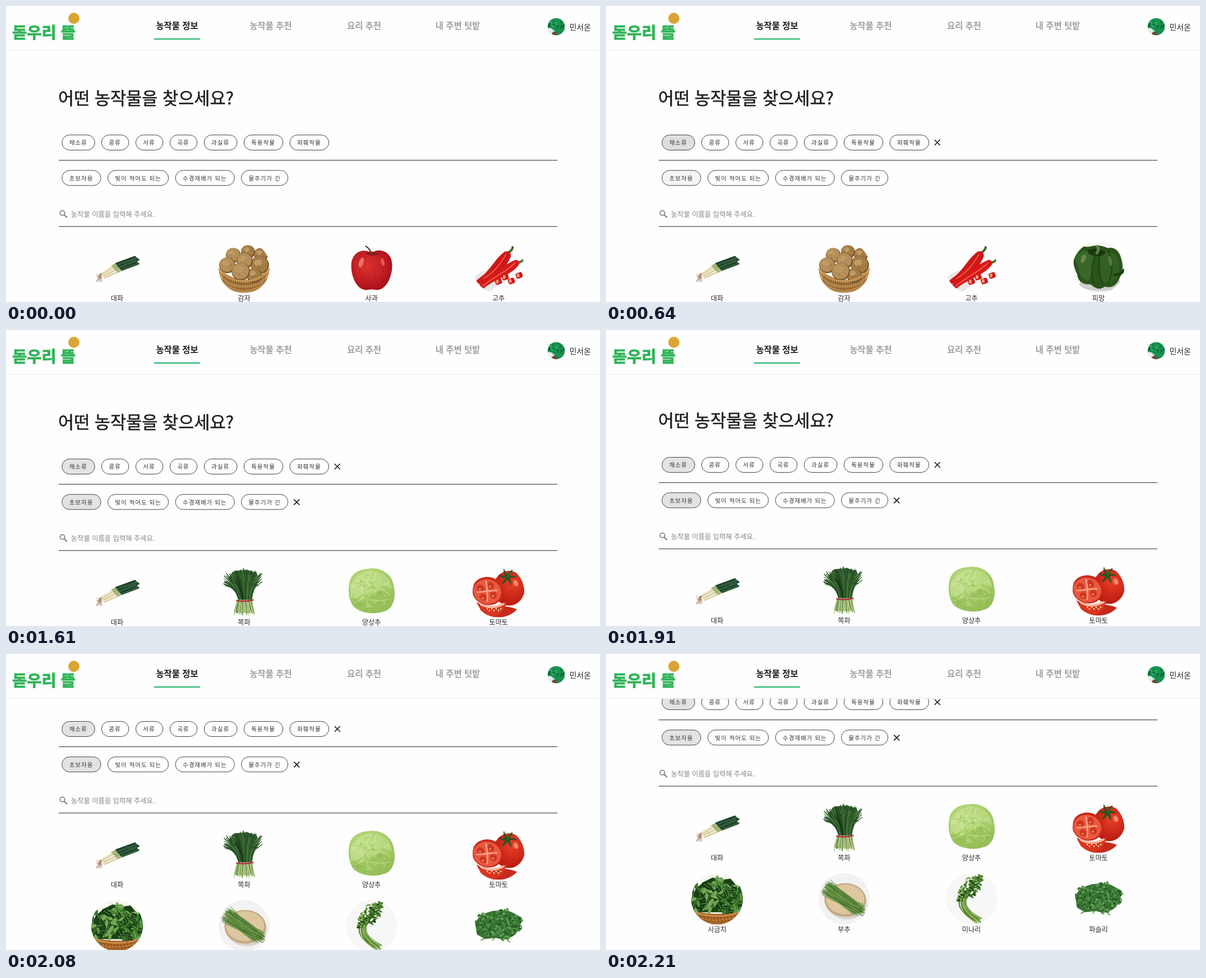
Recreate the animation shown at these times as an HTML page. Size 1059 by 529 pixels, loop 3020 ms.

```html
<!DOCTYPE html>
<html lang="ko">
<head>
<meta charset="utf-8">
<style>
html, body { margin: 0; width: 100%; height: 100%; overflow: hidden; background: #fefefe; }
svg { display: block; width: 100vw; height: 100vh; font-family: "Noto Sans CJK KR", "Noto Sans KR", "Noto Sans CJK", sans-serif; }
</style>
</head>
<body>
<svg id="stage" viewBox="0 0 1059 529"></svg>
<script>
const LOOP = 3020, SCROLL = 158;
const COLUMNS = [198, 424.5, 651.5, 878];

let seed = 1;
const rnd = (a = 0, b = 1) => {
  seed = (seed * 16807) % 2147483647;
  return a + (b - a) * seed / 2147483647;
};
const pick = list => list[Math.floor(rnd(0, list.length))];
const repeat = (n, make) => Array.from({ length: n }, (_, i) => make(i)).join('');

const path = (d, fill, stroke = 'none', w = 1) =>
  `<path d="${d}" fill="${fill}" stroke="${stroke}" stroke-width="${w}" stroke-linecap="round"/>`;
const line = (d, stroke, w = 1) => path(d, 'none', stroke, w);
const oval = (x, y, rx, ry, fill, turn = 0) =>
  `<ellipse rx="${rx}" ry="${ry}" fill="${fill}" transform="translate(${x} ${y}) rotate(${turn})"/>`;
const disc = (x, y, r, fill) => oval(x, y, r, r, fill);
const text = (x, y, size, str, fill, extra = '') =>
  `<text x="${x}" y="${y}" font-size="${size}" fill="${fill}" ${extra}>${str}</text>`;
const glow = (id, cx, cy, r, inner, outer) =>
  `<radialGradient id="${id}" cx="${cx}" cy="${cy}" r="${r}"><stop stop-color="${inner}"/><stop offset="1" stop-color="${outer}"/></radialGradient>`;
const MID = 'text-anchor="middle"';

// Each picture is drawn around 0,0 inside a disc of radius 46.
const food = {
  대파: () =>
    repeat(20, () => line(`M-28 ${rnd(9, 18)}Q-32 ${rnd(12, 20)} ${rnd(-37, -26)} ${rnd(10, 28)}`, '#a58268', .8)) +
    repeat(6, i => line(`M${-28 + i * 1.2} ${10 + i * 1.7}L${-6 + i * 2} ${-4 + i * 2.2}`, i % 2 ? '#cfc08c' : '#ece2bd', 1.9)) +
    repeat(6, i => line(`M${-9 + i * 2} ${-3 + i * 2.2}L${-1 + i * 2} ${-7 + i * 2.2}`, '#93a862', 2.4)) +
    repeat(6, i => line(`M${-1 + i * 2} ${-7 + i * 2.2}L${32 + i % 3 * 3} ${-19 + i * 2.4}`, i % 2 ? '#345d3c' : '#1b4029', 3.6)),

  감자: () =>
    path('M-45 2Q-43 44 0 45Q43 44 45 2Q25 20 0 22Q-25 20-45 2Z', '#a8763c') +
    [[7, -28, 12], [-19, -22, 13], [30, -23, 12], [-30, -4, 14], [28, -5, 16], [1, -12, 14], [18, 14, 13], [-6, 7, 16]]
      .map(([x, y, r], i) => oval(x, y, r + .5, r, '#79572b', 20) + oval(x - .6, y - 1, r - 1, r - 1.3, i % 2 ? '#b58f59' : '#a47c46') +
        oval(x - 3, y - 4, r * .45, r * .35, '#c09b65') +
        repeat(3, () => disc(x + rnd(-7, 7), y + rnd(-6, 7), .8, '#73522b'))).join('') +
    line('M-45 3Q-32 24 0 25Q32 24 45 3', '#d1a25e', 4) +
    line('M-42 14Q-28 34 0 34Q28 34 42 14', '#d1a25e', 4) +
    line('M-35 27Q-20 41 0 42Q20 41 35 27', '#c39450', 4) +
    repeat(21, i => {
      const x = (i - 10) * 3.9;
      return line(`M${x} ${25 - x * x * .009}l${-x * .13} 17`, '#714a20', 1);
    }),

  사과: () =>
    path('M0-26C14-37 37-29 37-4C37 20 24 41 9 40Q0 38-8 40C-25 41-36 18-36-3C-36-28-14-36 0-26Z', 'url(#apple)') +
    repeat(14, i => line(`M${-26 + i * 4} ${rnd(-24, -15)}q${(i - 7) * .5} 18 0 ${rnd(25, 42)}`, '#e85c4426', 1.6)) +
    oval(2, -25, 12, 3.5, '#8c1c1a') +
    line('M0-25Q-3-34-10-38', '#6b3a22', 2.5) +
    oval(-18, -9, 4, 9, '#ea7468', 18) + oval(20, -10, 3, 7, '#e55a50', -15),

  고추: () =>
    oval(-24, 26, 28, 19, '#e9e7e7', -30) +
    line('M17-27Q24-29 26-38', '#3c6b27', 4) +
    path('M12-29Q23-30 22-20C13 4-10 25-43 31Q-43 25-33 18C-15 6-5-18 12-29Z', '#cf1717') +
    line('M13-23C3-6-8 9-27 20', '#ee554a', 2) +
    line('M34-9Q42-9 46-17', '#467a2c', 4) +
    path('M31-14Q41-11 36-5C24 14-10 21-28 39Q-40 37-33 29C-13 14 10-6 31-14Z', '#d61919') +
    line('M29-8C16 6-9 17-28 33', '#ee5a4d', 2) +
    [[0, 25], [12, 17], [23, 24], [37, 14]].map(([x, y]) =>
      `<rect x="${x - 6}" y="${y - 5}" width="12" height="10" rx="3" fill="#cc1b1b" transform="rotate(-20 ${x} ${y})"/>` +
      oval(x - 2, y, 2.5, 3.5, '#f0a07e')).join(''),

  피망: () =>
    disc(0, 0, 46, '#f6f6f6') + oval(4, 29, 38, 13, '#cfcfcf') +
    path('M-43-26Q-37-40-18-37Q0-43 16-35Q34-38 40-18Q47 2 38 18Q30 39 11 34Q0 43-14 30Q-36 31-38 12Q-48-7-43-26Z', '#2b541b') +
    path('M-38-25Q-18-36-7-21Q-12 13-18 24Q-35 20-35 0Q-44-13-38-25Z', '#38672a') +
    path('M2-22Q25-35 34-17Q42 9 28 23Q12 33 5 20Z', '#335f22') +
    line('M-7-20Q-15 4-9 28M2-22Q-3 7 8 30M17-31Q30-5 18 28', '#1d4313', 2.2) +
    oval(-27, -16, 4, 8, '#66894f', 20) + oval(21, -12, 3, 9, '#557b42', -10) +
    path('M-20-31Q-3-38 13-27Q4-17-7-22Q-17-20-20-31Z', '#18370f') +
    line('M-3-26Q2-32-2-38', '#638447', 5) + line('M29 13Q40 13 45 5', '#1b3f12', 5),

  쪽파: () =>
    path('M-10 15Q-16-6-29-24L-18-37L5-39L22-34L27-22Q16-4 14 15Z', '#35602f') +
    repeat(130, () => {
      const x = rnd(-38, 33);
      return line(`M${2 + x * .3} 15Q${x * .42} -8 ${x} ${rnd(-43, -18) + Math.abs(x) * .3}`, pick(['#17391a', '#244f25', '#38682f', '#578348']), 1.2);
    }) +
    path('M-11 16L-17 37L17 39L15 16Z', '#a5bf79') +
    repeat(55, () => {
      const x = rnd(-12, 14);
      return line(`M${x} 15L${x * 1.5} ${rnd(30, 43)}`, pick(['#7da04d', '#a6c078', '#dfe6c8', '#517b39']), 1.2);
    }) +
    line('M-13 16Q2 19 16 15', '#b6333a', 2.6),

  양상추: () =>
    path('M-40-12C-38-30-26-40-4-41C16-44 38-32 40-8C45 10 38 34 20 36C4 42-24 38-34 24Q-43 8-40-12Z', 'url(#lettuce)') +
    path('M-38-10Q-24-38 4-37Q-10-18-14 2Q-24 14-37 12Z', '#cfe79d88') +
    path('M6-36Q34-32 37-4Q20-14 8-6Q0-20 6-36Z', '#c4e08c88') +
    path('M-34 18Q-10 20 4 2Q20-4 36 6Q32 30 12 35Q-18 38-34 18Z', '#94bd5788') +
    line('M-30 20Q0 8 8-34M-14 4Q-22-8-26-22M2 2Q18-8 30-18M-8 14Q14 18 32 14', '#e2f0bd99', 1.1) +
    repeat(60, () => {
      const a = rnd(0, 6.3), r = rnd(6, 34);
      return line(`M${Math.cos(a) * r} ${Math.sin(a) * r}q${rnd(-6, 6)} ${rnd(-6, 6)} ${rnd(-8, 8)} ${rnd(-8, 8)}`, pick(['#7dab4066', '#dcefae77']), 1.4);
    }),

  토마토: () =>
    oval(0, 36, 36, 10, '#c62a1d') +
    oval(19, -6, 28, 31, 'url(#tomato)') +
    oval(31, -15, 4, 6, '#f9826a', -25) +
    [0, 65, 130, 190, 245, 305].map(a => `<path transform="translate(16 -26) rotate(${a})" d="M0-2Q11-5 17 1Q9 0 0 3Z" fill="#30521f"/>`).join('') +
    line('M16-26Q18-32 24-35', '#3e6428', 2.5) +
    oval(-19, -1, 28, 25, '#c7281a', 15) + oval(-20, 0, 25, 22, '#e9593f', 15) +
    [[-32, -6], [-14, -11], [-27, 10], [-9, 6]].map(([x, y]) => oval(x, y, 6, 7, '#cf3722', x * 2) + disc(x - 1, y + 2, 1.6, '#f0a576')).join('') +
    line('M-22-18Q-19 0-20 17M-38 1Q-20-1-3-2', '#f6a48c', 2.6) +
    path('M-39 18Q-17 35 15 18Q9 42-12 46Q-32 40-39 18Z', '#d9341f') +
    line('M-31 23Q-12 33 9 22', '#f8b59b', 4) +
    repeat(7, i => oval(-20 + i * 4, 31 + i % 2 * 3, 1.3, 1.8, '#f4d19a')),

  시금치: () =>
    disc(0, 0, 46, '#f5f6ef') +
    path('M-46 0L-38-18L-24-30L-8-38L8-34L24-36L36-22L46-4V24H-46Z', '#1a4214') +
    path('M-46 20Q0 34 46 20V46H-46Z', '#a9642a') +
    repeat(110, () => {
      const x = rnd(-45, 45), y = rnd(-36 + Math.abs(x) * .3, 24), a = rnd(-90, 90);
      return oval(x, y, rnd(5, 11), rnd(2, 4.5), pick(['#12380f', '#1e5217', '#2d6b20', '#43832f', '#6a9f4c']), a) +
        `<path d="M-7 0H7" stroke="#a9c888" stroke-width=".7" transform="translate(${x} ${y}) rotate(${a})"/>`;
    }) +
    line('M-42 24Q0 38 42 24', '#cf9148', 2.5) + line('M-37 32Q0 45 36 31', '#c4843c', 2) +
    repeat(13, i => line(`M${-36 + i * 6} ${27 + 6 * Math.sin(i * .26)}l3 8`, '#7c4113', 1)),

  부추: () =>
    disc(0, 0, 46, '#f3f2f2') + oval(5, 7, 36, 30, '#d9d6d2') + oval(2, 2, 37, 30, '#c3a67a') +
    oval(2, 1, 34, 27, '#e0cba5') +
    repeat(6, i => `<ellipse cx="2" cy="1" rx="${6 + i * 5}" ry="${5 + i * 4}" fill="none" stroke="#cbb185" stroke-width=".8"/>`) +
    path('M-34-24L-22-27Q8-8 32 13L30 26L16 27Q-18 6-34-24Z', '#5d8440') +
    repeat(110, () => {
      const s = rnd(-12, 12);
      return line(`M${-28 + s * .6 + rnd(-9, 5)} ${-20 - s * .8 + rnd(-5, 5)}Q${rnd(-8, 4)} ${4 - s * .9} ${rnd(18, 38)} ${19 - s * .6 + rnd(-5, 6)}`, pick(['#325c22', '#4a7a2f', '#65913f', '#8aad60']), .9);
    }),

  미나리: () =>
    disc(0, 0, 46, '#f7f7f7') +
    repeat(32, () => {
      const s = rnd(-6, 6);
      return line(`M${2 + s} -20C${-22 + s} 0 ${-22 + s * 1.6} 18 ${12 + s * 1.5} ${rnd(34, 45)}`, pick(['#54852c', '#7aa646', '#a2c068', '#41751f']), 1.1);
    }) +
    repeat(170, () => {
      const t = rnd(), spread = 7 + 7 * Math.sin(t * 3.1);
      return oval(14 - t * 32 + rnd(-spread, spread), -38 + t * 37 + rnd(-spread, spread) * .8, rnd(1.5, 3.4), rnd(1, 2), pick(['#244d17', '#38691f', '#4c822c', '#6fa243']), rnd(0, 180));
    }),

  파슬리: () =>
    line('M2 5Q9 20 20 29M-8 5Q-18 20-31 26M0 6Q-4 18-10 26', '#6f9e4f', 2) +
    path('M-42-6L-30-20L-12-26L6-28L22-25L42-14L38 4L30 16L16 24L-6 22L-24 24L-38 16Z', '#3a7534') +
    repeat(420, () => {
      const a = rnd(0, 6.3), r = Math.sqrt(rnd());
      return disc(Math.cos(a) * r * 44, -2 + Math.sin(a) * r * (25 + 5 * Math.cos(a * 5)), rnd(.8, 2.4), pick(['#245822', '#35722f', '#4b8c42', '#69a25b']));
    })
};

const card = (name, i) => {
  seed = 4321;
  const x = COLUMNS[i % 4], y = 467.5 + Math.floor(i / 4) * 128;
  return `<g transform="translate(${x} ${y})"><g clip-path="url(#round)">${food[name]()}</g>` +
    text(0, 59, 12.2, name, '#2c2c2c', MID) + '</g>';
};
const results = (id, names) => `<g id="${id}">${names.split(' ').map(card).join('')}</g>`;

const chip = (x, y, w, label, id) => {
  const shape = `x="${x}" y="${y}" width="${w}" height="27" rx="13.5"`;
  const ripple = id ? `<clipPath id="${id}Clip"><rect ${shape}/></clipPath><g clip-path="url(#${id}Clip)"><circle id="${id}Ripple" cx="${x + 29.5}" cy="${y + 9}"/></g>` : '';
  return `<rect ${id ? `id="${id}"` : ''} ${shape} fill="#fefefe"/>${ripple}<rect ${shape} fill="none" stroke="#444"/>` +
    text(x + 12.9, y + 17.8, 10.6, label, '#383838', 'letter-spacing=".93"');
};
const cross = (id, x, y) => `<g id="${id}">${line(`M${x - 4.5} ${y - 4.5}l9 9m0-9l-9 9`, '#151515', 1.6)}</g>`;
const rule = y => `<rect x="94" y="${y}" width="889" height="1.3" fill="#555"/>`;
const tab = (x, label, fill = '#a0a0a0') => text(x, 41, 15.4, label, fill, MID + ' font-weight="600"');

stage.innerHTML = `
<defs>
  <clipPath id="round"><circle r="46"/></clipPath>
  ${glow('apple', .4, .4, .65, '#dc2e2c', '#a90f1b')}
  ${glow('tomato', .6, .35, .7, '#ea4028', '#b5170f')}
  ${glow('lettuce', .4, .3, .75, '#c3e087', '#93bd55')}
  <clipPath id="face"><circle cx="981" cy="37" r="15.3"/></clipPath>
</defs>
<g id="page">
  ${text(93, 176.3, 30.6, '어떤 농작물을 찾으세요?', '#1e1e1e', 'font-weight="500" stroke="#1e1e1e" stroke-width=".5"')}
  ${chip(99.8, 230.5, 58.5, '채소류', 'kind')}
  ${chip(170.4, 230.5, 48.5, '콩류')}${chip(231.4, 230.5, 48.5, '서류')}${chip(292.3, 230.5, 48.5, '곡류')}
  ${chip(353.2, 230.5, 58.8, '과실류')}${chip(424.3, 230.5, 69.5, '특용작물')}${chip(506, 230.5, 69.5, '화훼작물')}
  ${cross('clearKind', 590.7, 244)}${rule(275)}
  ${chip(99.8, 293.8, 69.3, '초보자용', 'trait')}
  ${chip(181.5, 293.8, 108.2, '빛이 적어도 되는')}${chip(302.1, 293.8, 105.2, '수경재배가 되는')}${chip(419.5, 293.8, 83.2, '물주기가 긴')}
  ${cross('clearTrait', 518.2, 307.6)}
  <circle cx="100.5" cy="370" r="4.2" fill="none" stroke="#757575" stroke-width="1.6"/>
  ${line('M103.8 373.3L108.3 377.8', '#757575', 2)}
  ${text(115.8, 377, 12.3, '농작물 이름을 입력해 주세요.', '#858585')}
  ${rule(393.5)}
  ${results('all', '대파 감자 사과 고추')}
  ${results('greens', '대파 감자 고추 피망')}
  ${results('easy', '대파 쪽파 양상추 토마토 시금치 부추 미나리 파슬리')}
</g>
<rect width="1059" height="79" fill="#fefefe"/>
<rect y="79" width="1059" height="1" fill="#e6e6e6"/>
${disc(121, 22, 10, '#dba536')}
${text(11, 57.5, 28.5, '돋우리 뜰', '#2fb457', 'font-weight="900" stroke="#2fb457" stroke-width=".9"')}
${tab(305, '농작물 정보', '#1c1c1c')}${tab(472, '농작물 추천')}${tab(638.5, '요리 추천')}${tab(805.5, '내 주변 텃밭')}
<rect x="264" y="58" width="82" height="2" fill="#1fb268"/>
<g clip-path="url(#face)">
  ${disc(981, 37, 16, '#17914f')}
  ${oval(970, 48, 10, 8, '#efeeee', 35)}${oval(978, 50, 5, 4, '#6b4b43')}
  ${repeat(45, () => disc(rnd(966, 996), rnd(22, 44), rnd(.8, 2), pick(['#0c6b38', '#35b86d', '#0b4f2d'])))}
</g>
${text(1004.5, 42.8, 13.9, '민서온', '#262626')}`;

const $ = id => document.getElementById(id);
const show = (id, on) => $(id).setAttribute('display', on ? 'inline' : 'none');
const clamp = v => Math.max(0, Math.min(1, v));
const ease = x => x ** 1.9 / (x ** 1.9 + (1 - x) ** 1.9);

function ripple(id, age) {
  const dot = $(id + 'Ripple');
  dot.setAttribute('r', age < 0 ? 0 : 18 + 45 * clamp(age / 220));
  dot.setAttribute('fill-opacity', .13 * (1 - clamp((age - 180) / 160)));
}

function draw(t) {
  const first = t >= 400, second = t >= 1240;
  show('all', !first);
  show('greens', first && !second);
  show('easy', second);
  show('clearKind', first);
  show('clearTrait', second);
  $('kind').setAttribute('fill', first ? (t < 1070 ? '#dfdfdf' : '#e3e3e3') : t < 240 ? '#fefefe' : '#f5f5f5');
  $('trait').setAttribute('fill', second ? (t < 1610 ? '#dfdfdf' : '#e3e3e3') : t < 580 ? '#fefefe' : '#f5f5f5');
  ripple('kind', t - 270);
  ripple('trait', t - 1070);
  // Scrolling advances in ten refreshes, by whole pixels.
  const step = t < 1910 ? 0 : Math.floor((t - 1910) / 33.33) + 1;
  const y = step ? Math.round(SCROLL * ease(clamp(step / 10 + .008))) : 0;
  $('page').setAttribute('transform', `translate(0 ${-y})`);
}

const start = performance.now();
function tick(now) {
  draw(Math.max(0, now - start) % LOOP);
  requestAnimationFrame(tick);
}
draw(0);
requestAnimationFrame(tick);
</script>
</body>
</html>
```
